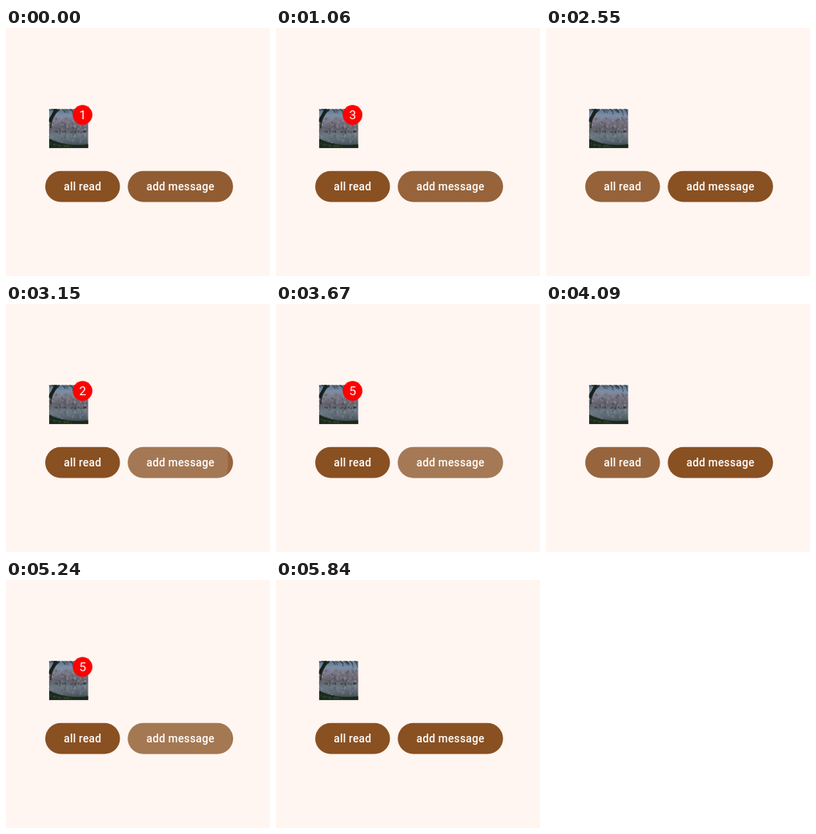
Animation, 330 px wide and 310 px high, one loop 7480 ms. Source, as an HTML page with a canvas:

```html
<!DOCTYPE html>
<html lang="en">
<head>
<meta charset="utf-8">
<title>Message badge</title>
<style>
html, body { margin: 0; width: 100%; height: 100%; overflow: hidden; background: #fff6f2; }
canvas { display: block; }
</style>
</head>
<body>
<canvas id="stage" width="330" height="310"></canvas>
<script>
const LOOP = 7480;
const TICK = 141; // the picture is refreshed about seven times a second
const ctx = document.getElementById('stage').getContext('2d');

// Each round is a burst of taps on "add message", ended by one tap on "all read".
const rounds = [
  { start: -285, count: 5, interval: 524, hold: 205, readAt: 2255 },
  { start: 2820, count: 5, interval: 160, hold: 350, readAt: 3945 },
  { start: 4510, count: 5, interval: 142, hold: 250, readAt: 5290 }
];
const addTaps = rounds.flatMap(({ start, count, interval, hold }) =>
  Array.from({ length: count }, (_, i) => ({ press: start + i * interval, hold })));
const readTaps = rounds.map(({ readAt }) => ({ press: readAt, hold: 250 }));

const buttons = [
  { label: 'all read', x: 49, width: 93.5, tapX: 95, taps: readTaps },
  { label: 'add message', x: 152.2, width: 131.6, tapX: 213, taps: addTaps }
];

const clamp = v => Math.max(0, Math.min(1, v));

function circle(x, y, radius, color) {
  ctx.fillStyle = color;
  ctx.beginPath();
  ctx.arc(x, y, radius, 0, Math.PI * 2);
  ctx.fill();
}

function curve(x1, y1, midX, midY, x2, y2, width, color) {
  ctx.strokeStyle = color;
  ctx.lineWidth = width;
  ctx.beginPath();
  ctx.moveTo(x1, y1);
  ctx.quadraticCurveTo(midX, midY, x2, y2);
  ctx.stroke();
}

function text(label, x, y, font, spacing) {
  ctx.font = font;
  ctx.letterSpacing = spacing;
  ctx.textAlign = 'center';
  ctx.fillStyle = '#fff';
  ctx.fillText(label, x, y);
}

function seededRandom(seed) {
  return () => (seed = seed * 16807 % 2147483647) / 2147483647;
}

// Lake with blossoming trees, their reflections, and a dark tree in front
function drawPhoto() {
  const size = 49, shore = 28;
  const random = seededRandom(11);
  ctx.save();
  ctx.translate(53.8, 101.2);
  ctx.beginPath();
  ctx.rect(0, 0, size, size);
  ctx.clip();

  const backdrop = ctx.createLinearGradient(0, 0, 0, size);
  ['#5b7490', '#7d8ea5', '#747581', '#5d6068', '#6c7781', '#56636c', '#2b3731']
    .forEach((color, i, all) => backdrop.addColorStop(i / (all.length - 1), color));
  ctx.fillStyle = backdrop;
  ctx.fillRect(0, 0, size, size);

  for (let i = 0; i < 110; i++) {
    const x = random() * size, height = 1 + random() * 16, radius = .5 + random() * 1.3;
    const light = 25 + random() * 38;
    circle(x, shore - height, radius, `hsla(${230 + random() * 110}, 9%, ${light}%, .5)`);
    circle(x, shore + 1 + height * .75, radius, `hsla(215, 10%, ${light}%, .3)`);
  }
  for (let i = 0; i < 20; i++) {
    circle(random() * size, shore - .5 + random() * 2, .9, 'rgba(42,51,51,.7)');
  }

  ctx.fillStyle = '#1b2a1e';
  ctx.beginPath();
  ctx.moveTo(0, 37);
  ctx.quadraticCurveTo(22, 48, size, 44);
  ctx.lineTo(size, size);
  ctx.lineTo(0, size);
  ctx.fill();
  for (let i = 0; i < 25; i++) {
    const x = random() * 28;
    circle(x, 42 + x * .13 + random() * 3, 1, 'rgba(55,77,42,.5)');
  }

  curve(0, 16, 4, 10, 9, 0, 4, '#172019');
  curve(2, 24, 2, 10, 13, 0, 1.5, '#1d2721');
  for (let i = 0; i < 28; i++) {
    const x = random() * size, drop = 2 + 9 * random() * (x / size);
    curve(x - 3, 0, x, 1, x + 1, drop, .8, 'rgba(30,41,39,.75)');
  }
  ctx.restore();
}

function drawButton({ label, x, width, tapX, taps }, time) {
  const reach = Math.max(tapX - x, x + width - tapX) + 10;
  ctx.save();
  ctx.beginPath();
  ctx.roundRect(x, 178.7, width, 38.8, 19.4);
  ctx.fillStyle = '#895022';
  ctx.fill();
  ctx.clip();
  for (const { press, hold } of taps) {
    const age = time - press;
    const alpha = .12 * clamp(age / 50) * (1 - clamp((age - hold) / 200));
    if (alpha <= 0) continue;
    const growth = 1 - (1 - clamp(age / 225)) ** 2;
    circle(tapX, 197.5, reach * (.05 + .95 * growth), `rgba(255,255,255,${alpha})`);
  }
  ctx.restore();
  text(label, x + width / 2, 202.7, '500 13.75px Roboto, sans-serif', '0.22px');
}

function unreadCount(time) {
  const cleared = readTaps.findLast(({ press }) => press <= time)?.press ?? -Infinity;
  return addTaps.filter(({ press }) => press <= time && press > cleared).length;
}

function draw(time) {
  ctx.fillStyle = '#fff6f2';
  ctx.fillRect(0, 0, 330, 310);
  drawPhoto();
  const count = unreadCount(time);
  if (count) {
    circle(95.7, 108.6, 12.3, '#f00');
    text(count, 95.8, 114.3, '15.5px Roboto, sans-serif', '0px');
  }
  buttons.forEach(button => drawButton(button, time));
}

const start = performance.now();
function frame() {
  const time = (performance.now() - start) % LOOP;
  draw(Math.floor(time / TICK) * TICK);
  requestAnimationFrame(frame);
}
frame();
</script>
</body>
</html>
```
